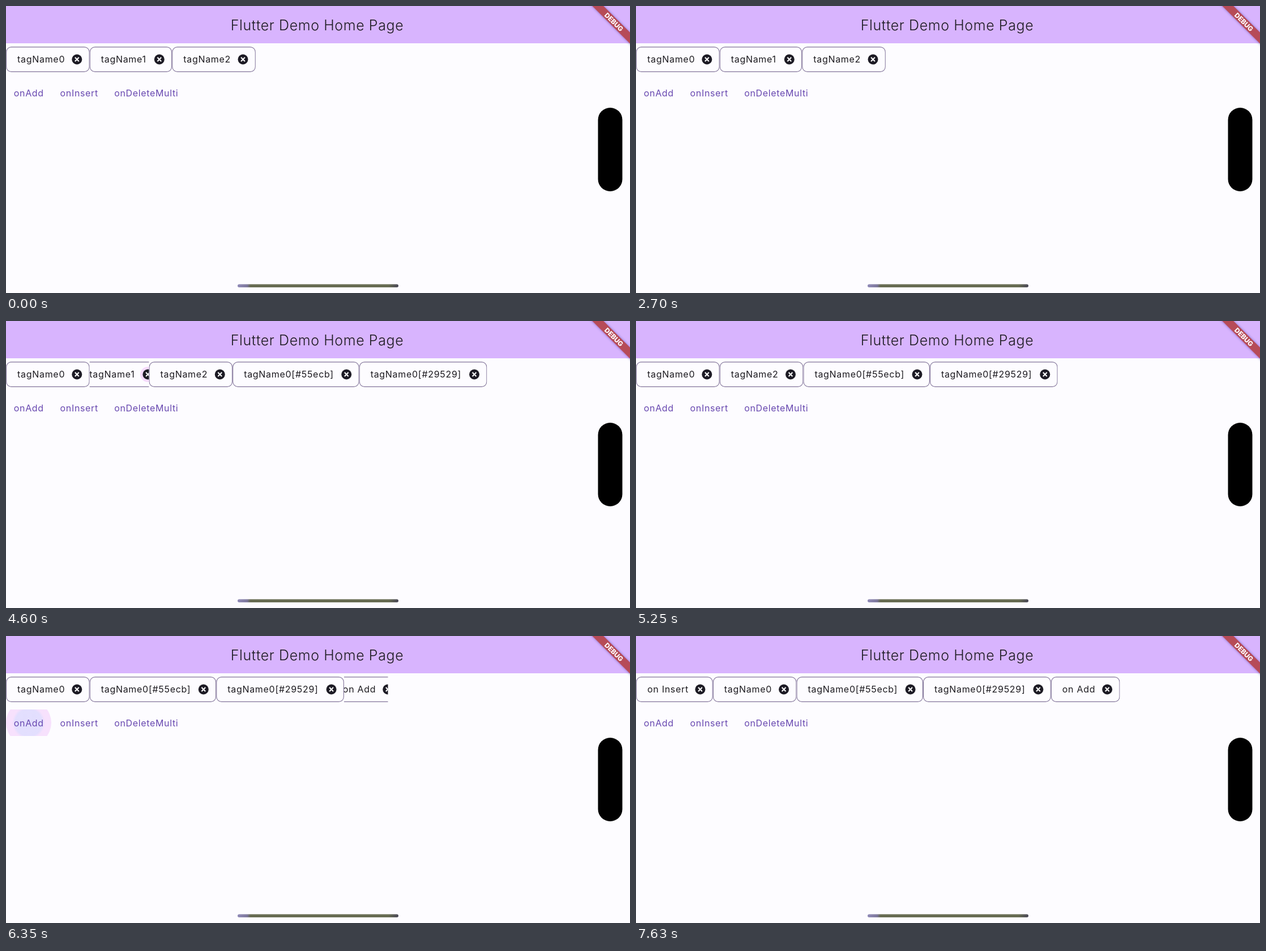
An HTML page that plays this animation: 1102x508 px, repeating every 8 s.

```html
<!DOCTYPE html>
<html lang="en">
<head>
<meta charset="utf-8">
<title>Tag list</title>
<style>
  html, body { margin: 0; width: 100%; height: 100%; overflow: hidden; background: #fdfcff; }
  svg { display: block; }
  text { font: 16px Inter, Roboto, sans-serif; fill: #1d1b20; white-space: pre; }
  .title { font-size: 25px; font-weight: 350; letter-spacing: .6px; }
  .label { letter-spacing: .7px; }
  .button { letter-spacing: .65px; fill: #6848b0; }
  .debug { font-size: 11.8px; font-weight: 800; fill: #fff; text-anchor: middle; }
  .border { fill: none; stroke: #82749a; stroke-width: 1.1; }
</style>
</head>
<body>
<svg id="stage" width="1102" height="508" viewBox="0 0 1102 508">
  <defs>
    <radialGradient id="ink">
      <stop offset=".6" stop-color="#dbd6fe"/>
      <stop offset=".72" stop-color="#f5d9fc"/>
    </radialGradient>
    <linearGradient id="bar">
      <stop offset="0" stop-color="#918bb8"/>
      <stop offset=".06" stop-color="#7d789c"/>
      <stop offset=".08" stop-color="#676c52"/>
      <stop offset=".94" stop-color="#676c52"/>
      <stop offset="1" stop-color="#4a4858"/>
    </linearGradient>
    <filter id="shadow" x="-20%" y="-60%" width="140%" height="220%">
      <feDropShadow dx="0" dy="0" stdDeviation="2.2" flood-color="#3a49b0" flood-opacity=".6"/>
    </filter>
  </defs>
  <rect width="1102" height="508" fill="#fdfcff"/>
  <rect width="1102" height="66" fill="#d8b4fe"/>
  <text class="title" x="396.8" y="42.5">Flutter Demo Home Page</text>
  <g transform="translate(1102 0) rotate(45)">
    <rect x="-60" y="33" width="120" height="14.2" fill="#b64c58" filter="url(#shadow)"/>
    <text class="debug" y="44.4">DEBUG</text>
  </g>
  <g id="chips"></g>
  <g id="buttons"></g>
  <rect x="1045.5" y="180" width="43" height="148" rx="21.5"/>
  <rect x="409" y="492.5" width="284" height="5.5" rx="2.75" fill="url(#bar)"/>
</svg>
<script>
const LOOP = 8000, RESIZE = 300, FADE = 400;

// Chips in list order; shown and removed are the starts of their size transitions.
const chips = [
  { label: 'on Insert', width: 135.8, shown: 7230 },
  { label: 'tagName0', width: 147.7, taps: [[2700, 2750], [3290, 3424]] },
  { label: 'tagName1', width: 145.5, removed: 4517, closeTap: [4460, 4517] },
  { label: 'tagName2', width: 147.7, removed: 5299, closeTap: [5250, 5299] },
  { label: 'tagName0[#55ecb]', width: 223.5, shown: 2750 },
  { label: 'tagName0[#29529]', width: 225.8, shown: 3424 },
  { label: 'on Add', width: 121.8, shown: 6160 }
];
const buttons = [
  { label: 'onAdd', x: 13.8, center: 40, tap: [6040, 6160] },
  { label: 'onInsert', x: 95.6, center: 132.5, tap: [7080, 7230] },
  { label: 'onDeleteMulti', x: 191.2, center: 248 }
];
const ripples = [];
const clamp = v => Math.max(0, Math.min(1, v));

function add(parent, name, attrs, text = '') {
  const node = document.createElementNS('http://www.w3.org/2000/svg', name);
  set(node, attrs);
  node.textContent = text;
  return parent.appendChild(node);
}

function set(node, attrs) {
  for (const key in attrs) node.setAttribute(key, attrs[key]);
}

function addRipple(parent, cx, cy, radius, [press, release]) {
  const node = add(parent, 'circle', { cx, cy, fill: 'url(#ink)' });
  ripples.push({ node, radius, press, release });
}

const chipLayer = document.getElementById('chips');
for (const chip of chips) {
  const { label, width, taps = [], closeTap } = chip;
  const closeX = width - 22.4;
  chip.slot = add(chipLayer, 'svg', { y: 71, height: 47, overflow: 'hidden' });
  chip.body = add(chip.slot, 'g', {});
  for (const tap of taps) addRipple(chip.body, 67, 23.5, 62, tap);
  if (closeTap) addRipple(chip.body, closeX, 23.5, 15, closeTap);
  add(chip.body, 'rect', { class: 'border', x: .6, y: 1.6, width: width - 1.2, height: 43.8, rx: 9 });
  add(chip.body, 'text', { class: 'label', x: 20, y: 29.3 }, label);
  add(chip.body, 'circle', { cx: closeX, cy: 23.5, r: 9, fill: '#1d1b25' });
  add(chip.body, 'path', {
    d: `M${closeX - 3.4} 20.1l6.8 6.8m0-6.8l-6.8 6.8`, stroke: '#fff', 'stroke-width': 2.1
  });
}

const buttonLayer = document.getElementById('buttons');
for (const { label, x, center, tap } of buttons) {
  if (tap) {
    const area = add(buttonLayer, 'svg', { y: 130, width: 1102, height: 47, overflow: 'hidden' });
    addRipple(area, center, 23.5, 40, tap);
  }
  add(buttonLayer, 'text', { class: 'button', x, y: 159.5 }, label);
}

function draw(time) {
  let x = 0;
  for (const { slot, body, width, shown = -RESIZE, removed = Infinity } of chips) {
    const size = clamp((time - shown) / RESIZE) * (1 - clamp((time - removed) / RESIZE));
    set(slot, { x, width: width * size });
    set(body, { transform: `translate(${(size - 1) * width / 2} 0)` });
    x += width * size;
  }
  for (const { node, radius, press, release } of ripples) {
    const growth = 1 - (1 - clamp((time - press) / 300)) ** 3;
    const fade = clamp((time - release) / FADE);
    set(node, {
      r: radius * (.3 + .7 * growth),
      opacity: clamp((time - press) / 75) * (1 - fade * fade)
    });
  }
}

const start = performance.now();
function tick() {
  draw((performance.now() - start) % LOOP);
  requestAnimationFrame(tick);
}
tick();
</script>
</body>
</html>
```
